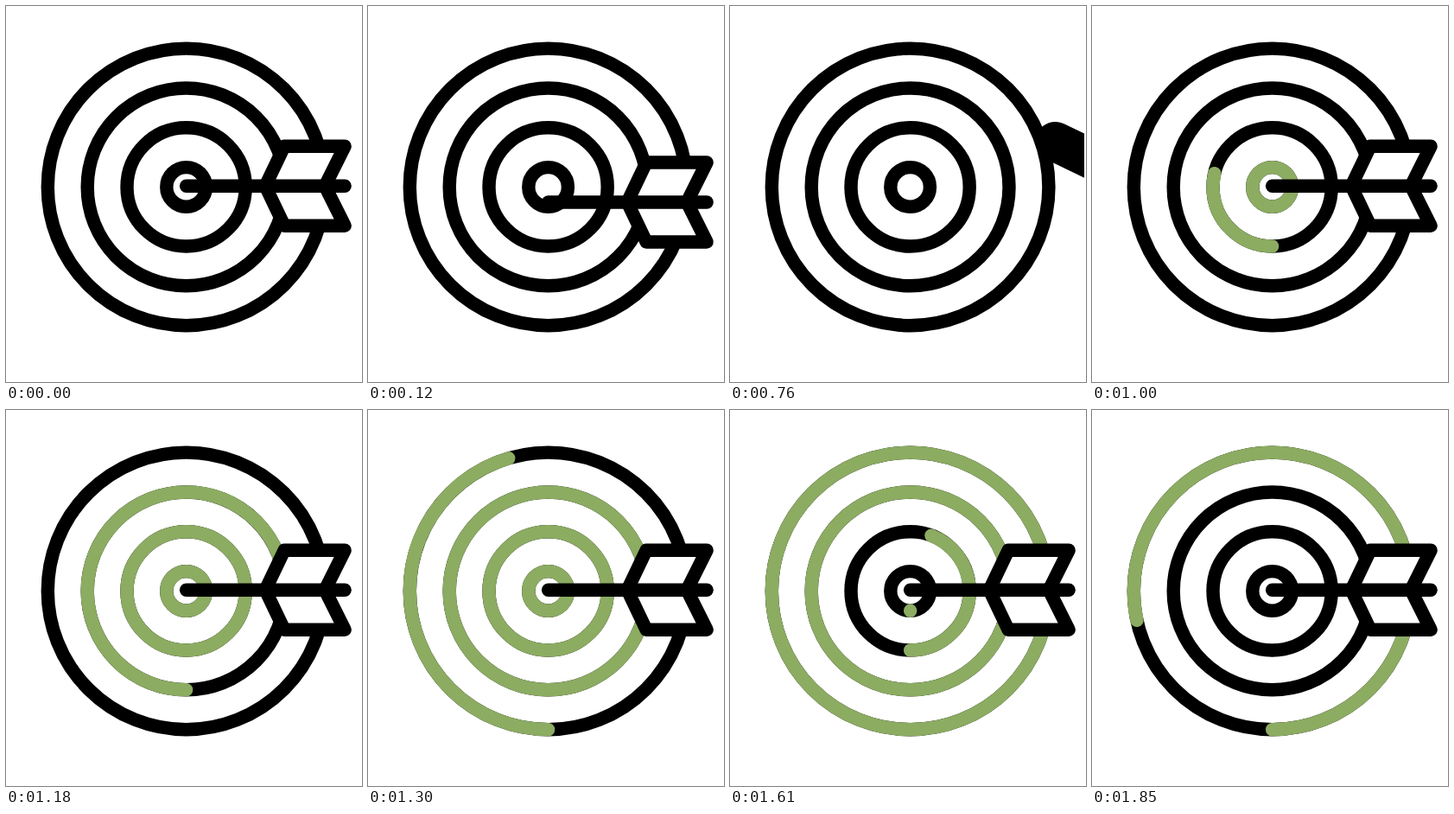
An HTML page that plays this animation: 412x435 px, repeating every 1910 ms.

```html
<!DOCTYPE html>
<html lang="en">
<head>
<meta charset="utf-8">
<title>Target</title>
<style>
  html, body { margin: 0; width: 100%; height: 100%; overflow: hidden; background: #fff; }
  svg { display: block; overflow: hidden; }
  svg * { stroke-width: 15.4; stroke-linecap: round; stroke-linejoin: round; }
</style>
</head>
<body>
<svg width="410" height="435">
  <g id="rings" fill="none" transform="translate(208.6 209.4) rotate(90)"></g>
  <!-- The arrow's origin is its tip. -->
  <g id="arrow" stroke="#000" fill="#fff">
    <path d="M91.5 0L113.5 -46H183.5L160.5 0L183.5 46H113.5Z"/>
    <path d="M0 0H183.5"/>
  </g>
</svg>
<script>
const LOOP = 1910;
const GREEN = '#8cac62';
const RADII = [22.8, 68.6, 114.4, 160.3];
const DRAW_START = [868, 954, 1097, 1239];
const ERASE_START = [1482, 1540, 1675, 1811];
const SWEEP = 130;
const TIP = { x: 208.6, y: 208.2 };
const ENTRY = { x: 376.5, y: 157, scale: 3, angle: 25.6 };
const ENTER_AT = 760, LAND_AT = 880, GONE_AT = 300;

const arrow = document.getElementById('arrow');
const rings = document.getElementById('rings');

const clamp = v => Math.min(1, Math.max(0, v));
const mix = (a, b, u) => a + (b - a) * u;
const ease = u => u * u * (3 - 2 * u);
const sweep = (t, start) => ease(clamp((t - start) / SWEEP));

function addCircle(r, color) {
  const circle = document.createElementNS(rings.namespaceURI, 'circle');
  circle.setAttribute('r', r);
  circle.setAttribute('stroke', color);
  circle.setAttribute('pathLength', 100);
  rings.append(circle);
  return circle;
}

RADII.forEach(r => addCircle(r, '#000'));
const arcs = RADII.map(r => addCircle(r, GREEN));

function showArc(arc, from, to) {
  arc.style.display = to > from ? '' : 'none';
  const full = from === 0 && to === 1;
  arc.setAttribute('stroke-dasharray', full ? 'none' : `${(to - from) * 100} 200`);
  arc.setAttribute('stroke-dashoffset', -from * 100);
}

function placeArrow(t) {
  arrow.style.display = t >= GONE_AT && t < ENTER_AT ? 'none' : '';
  let { x, y } = TIP, scale = 1, angle = 0;
  if (t < GONE_AT) {
    y += 150 * (t / 240) ** 3;
  } else {
    const u = clamp((t - ENTER_AT) / (LAND_AT - ENTER_AT));
    x = mix(ENTRY.x, x, u);
    y = mix(ENTRY.y, y, u);
    scale = mix(ENTRY.scale, 1, u);
    angle = mix(ENTRY.angle, 0, u);
  }
  arrow.setAttribute('transform', `translate(${x} ${y}) rotate(${angle}) scale(${scale})`);
}

// The motion advances in 60 ms steps, with two slightly longer holds.
function stepTime(t) {
  const shift = t < 700 ? 0 : t < 1490 ? 40 : 50;
  return t - (t - shift) % 60;
}

function render(now) {
  const t = stepTime(now % LOOP);
  arcs.forEach((arc, i) => showArc(arc, sweep(t, ERASE_START[i]), sweep(t, DRAW_START[i])));
  placeArrow(t);
}

const startTime = performance.now();
function tick() {
  render(performance.now() - startTime);
  requestAnimationFrame(tick);
}
tick();
</script>
</body>
</html>
```
